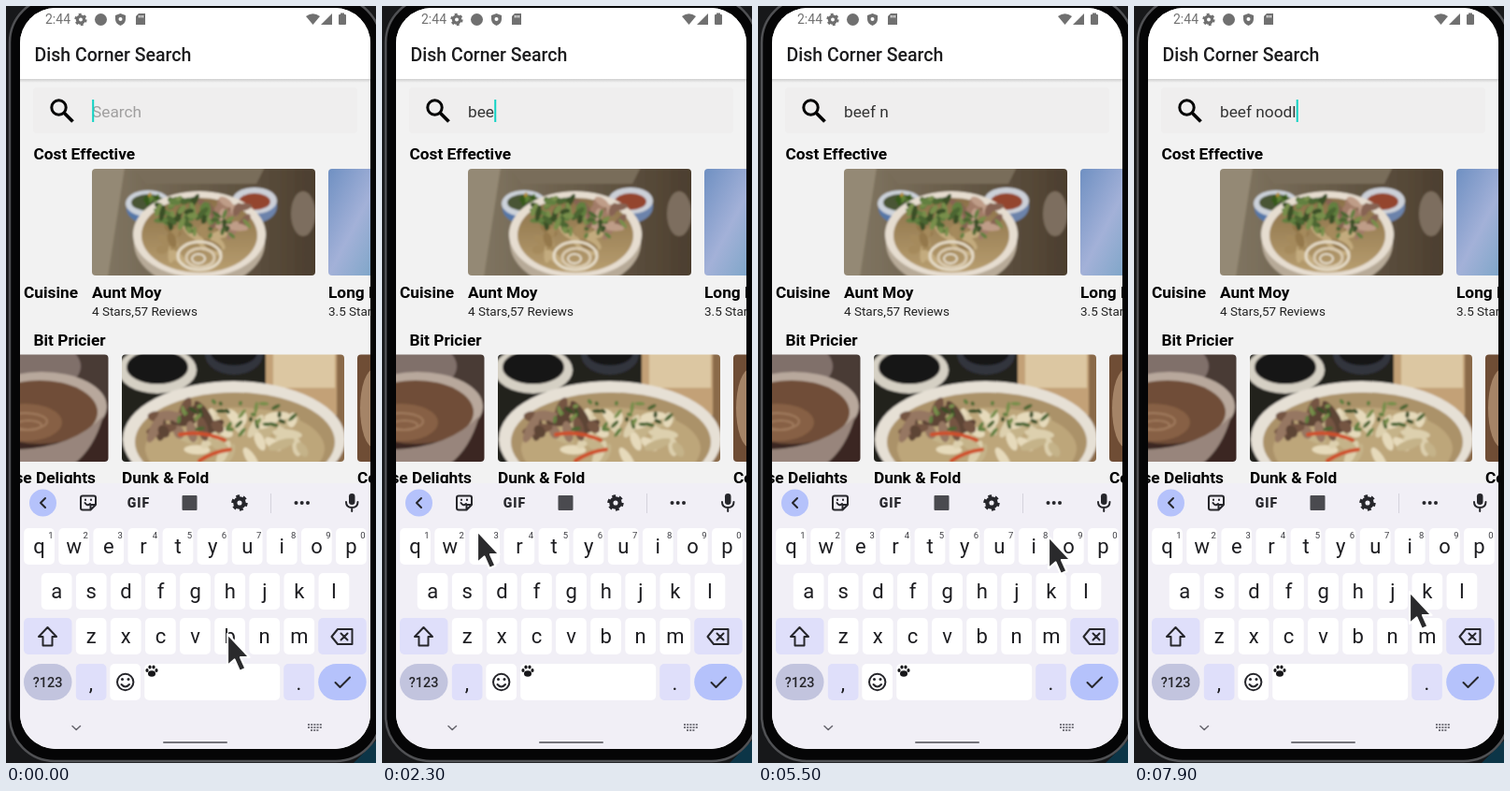
An HTML page for the animation above (8 s loop, 396 by 809 pixels).

```html
<!DOCTYPE html>
<html lang="en">
<head>
<meta charset="utf-8">
<title>Noodle search on a phone</title>
<style>
html, body { margin: 0; width: 100%; height: 100%; overflow: hidden; background: #111; }
svg { display: block; width: 396px; height: 809px; font-family: Roboto, sans-serif; }
.bold { font-weight: 700; font-size: 17.3px; }
.small { font-size: 13.5px; fill: #222; }
.field { font-size: 17.3px; white-space: pre; }
.key { font-size: 22px; text-anchor: middle; fill: #1d1d21; }
.hint { font-size: 9.5px; text-anchor: end; fill: #3c3c42; }
.line { fill: none; stroke: #26262b; stroke-width: 2; stroke-linejoin: round; stroke-linecap: round; }
</style>
</head>
<body>
<svg viewBox="0 0 396 809">
  <defs>
    <clipPath id="screen"><rect x="15" y="2" width="375" height="792" rx="38"/></clipPath>
    <clipPath id="content"><rect x="15" y="78" width="375" height="432"/></clipPath>
    <clipPath id="photoA"><rect x="92" y="174" width="239" height="114" rx="4"/></clipPath>
    <clipPath id="photoB"><rect x="5" y="372.500" width="104.500" height="114.500" rx="4"/></clipPath>
    <clipPath id="photoC"><rect x="124" y="372.500" width="238" height="114.500" rx="4"/></clipPath>
    <filter id="soft"><feGaussianBlur stdDeviation=".9"/></filter>
    <linearGradient id="table"><stop stop-color="#857a66"/><stop offset=".5" stop-color="#685c49"/><stop offset="1" stop-color="#4a3c2d"/></linearGradient>
    <linearGradient id="sky" x2="1" y2="1"><stop stop-color="#6f90c2"/><stop offset=".5" stop-color="#a3b1d8"/><stop offset="1" stop-color="#75a3c4"/></linearGradient>
    <linearGradient id="broth" x2="0" y2="1"><stop stop-color="#8a7048"/><stop offset="1" stop-color="#b89e70"/></linearGradient>
    <linearGradient id="fade" x2="0" y2="1"><stop stop-color="#cfcfcf"/><stop offset="1" stop-color="#f2f2f2"/></linearGradient>
  </defs>
  <rect width="396" height="809" fill="#17181a"/>
  <path d="M372 809L396 785V809Z" fill="#0c3547"/>
  <rect x="4" y="-9" width="397" height="816" rx="48" fill="#050506" stroke="#505154" stroke-width="2.500"/>
  <g clip-path="url(#screen)">
    <rect x="15" width="375" height="809" fill="#f2f2f2"/>
    <rect x="15" width="375" height="78" fill="#fff"/>
    <rect x="15" y="78" width="375" height="4" fill="url(#fade)"/>
    <g id="status" fill="#707070"></g>
    <text x="30.500" y="59" font-size="19.500" font-weight="500" fill="#1c1c1e">Dish Corner Search</text>
    <rect x="29" y="87" width="347" height="49" rx="4" fill="#efeeee"/>
    <circle cx="56.500" cy="108.500" r="7.700" fill="none" stroke="#000" stroke-width="3"/>
    <path d="M62 114L71.500 123.500" stroke="#000" stroke-width="3.800"/>
    <g clip-path="url(#content)">
      <g id="photos"></g>
      <g class="bold">
        <text x="29.500" y="164">Cost Effective</text>
        <text x="77" y="312" text-anchor="end">Cuisine</text>
        <text x="92" y="312">Aunt Moy</text>
        <text x="345" y="312">Long Bay</text>
        <text x="29.500" y="363">Bit Pricier</text>
        <text x="96" y="510" text-anchor="end">se Delights</text>
        <text x="124" y="510">Dunk &amp; Fold</text>
        <text x="376" y="510">Corner</text>
      </g>
      <text class="small" x="92" y="331">4 Stars,57 Reviews</text>
      <text class="small" x="345" y="331">3.5 Stars</text>
    </g>
    <text id="query" class="field" x="92" y="119"></text>
    <rect id="caret" y="100" width="2" height="24" fill="#10d3c4"/>
    <g id="keyboard"></g>
  </g>
  <path id="pointer" d="M0 0V34L7.500 27.500L13 40L19.500 37L14 25H23.500Z" fill="#2a2a2c" stroke="#fff" stroke-width="2.200" stroke-linejoin="round"/>
</svg>
<script>
const $ = id => document.getElementById(id);
const rect = (x, y, w, h, fill, r = 0) =>
  `<rect x="${x}" y="${y}" width="${w}" height="${h}" rx="${r}" fill="${fill}"/>`;
const oval = (x, y, rx, ry, fill, extra = '') =>
  `<ellipse cx="${x}" cy="${y}" rx="${rx}" ry="${ry}" fill="${fill}" ${extra}/>`;
const ring = (x, y, rx, ry, color, w) =>
  oval(x, y, rx, ry, 'none', `stroke="${color}" stroke-width="${w}"`);
const line = (d, extra = '') => `<path class="line" d="${d}" ${extra}/>`;
const shape = (d, fill) => `<path d="${d}" fill="${fill}"/>`;
const text = (cls, x, y, s) => `<text class="${cls}" x="${x}" y="${y}">${s}</text>`;
const photo = (id, body) => `<g clip-path="url(#${id})"><g filter="url(#soft)">${body}</g></g>`;

function gear(x, y, r, color) {
  const tooth = Math.PI * r / 8;
  return ring(x, y, r * .55, r * .55, color, r * .5) +
    oval(x, y, r * .85, r * .85, 'none',
      `stroke="${color}" stroke-width="${r * .35}" stroke-dasharray="${tooth * 1.13}"`);
}

let seed = 7;
const random = () => (seed = seed * 16807 % 2147483647) / 2147483647;

// Scatters small leaves or slices inside an ellipse.
function scatter(n, x, y, rx, ry, size, colors) {
  let out = '';
  for (let i = 0; i < n; i++) {
    const a = random() * 6.28, d = Math.sqrt(random());
    const px = x + Math.cos(a) * d * rx, py = y + Math.sin(a) * d * ry;
    out += oval(px, py, size * (.6 + random()), size * .5, colors[i % colors.length],
      `transform="rotate(${random() * 180} ${px} ${py})"`);
  }
  return out;
}

const greens = ['#4c6631', '#62803f', '#3a4f28', '#788f4c'];
const meats = ['#a27c68', '#bf9d88', '#876452'];
const noodles = ['#ddd0ae', '#c5b389', '#e6dabb'];

$('photos').innerHTML =
  photo('photoA',
    rect(84, 166, 255, 130, 'url(#table)') +
    shape('M84 166H128L108 296H84Z', '#948974') +
    shape('M130 166H280L268 190H150Z', '#796d5a') +
    oval(318, 222, 13, 24, '#7d6e5e') +
    oval(152, 216, 23, 17, '#5577a9') + oval(152, 211, 24, 14, '#ccd2da') + oval(152, 210, 18, 9, '#4a5436') +
    scatter(8, 152, 209, 13, 5, 5, ['#5e8434', '#36591f', '#b08a34']) +
    oval(266, 214, 24, 18, '#6c83ab') + oval(266, 208, 24, 14, '#ccd0d8') + oval(266, 209, 17, 9, '#94452d') +
    oval(207, 253, 70, 48, '#b7aa98') +
    oval(207, 244, 71, 46, '#e6ddd0') + oval(207, 245, 62, 40, 'url(#broth)') +
    scatter(20, 200, 256, 44, 20, 9, ['#a58a5c', '#c3ab7e', '#94784c']) +
    scatter(20, 232, 226, 27, 17, 8, meats) +
    scatter(40, 188, 224, 32, 18, 6, greens) +
    scatter(18, 230, 238, 32, 16, 4, greens) +
    ring(207, 267, 23, 15, '#e6dcc8', 3) + ring(208, 269, 15, 10, '#dacbb0', 3) + ring(206, 270, 7, 5, '#e8e0d0', 2)) +
  rect(345, 174, 60, 114, 'url(#sky)', 4) +
  photo('photoB',
    rect(-5, 364, 125, 134, '#493b35') +
    oval(25, 385, 55, 30, '#80706a') +
    shape('M-5 430Q60 395 119 425V497H-5Z', '#3b2823') +
    oval(38, 428, 70, 37, '#b8a89c') + oval(36, 434, 62, 34, '#704d37') +
    oval(20, 445, 40, 20, '#876045') +
    ring(20, 444, 24, 9, '#a17b5e', 2) + ring(24, 448, 14, 5, '#a17b5e', 2) +
    shape('M5 474Q70 474 104 438Q92 482 60 497H5Z', '#98857b')) +
  photo('photoC',
    rect(116, 364, 254, 132, '#24211f') +
    oval(244, 372, 31, 22, '#33353d') + oval(244, 370, 25, 14, '#171513') +
    rect(278, 364, 92, 74, '#c3a177') + rect(286, 364, 66, 44, '#dcc7a2') +
    rect(354, 364, 16, 132, '#8a6b4a') +
    oval(162, 389, 42, 25, '#d5d0c4') + oval(162, 386, 33, 18, '#191513') +
    oval(244, 463, 119, 62, '#e6e0d5') + oval(245, 466, 107, 53, '#ab9269') +
    oval(245, 473, 96, 44, '#bda67a') +
    scatter(34, 262, 460, 74, 26, 10, noodles) +
    scatter(18, 193, 447, 37, 17, 11, ['#745443', '#967762', '#5d4435']) +
    scatter(30, 248, 438, 65, 18, 4, greens) +
    '<path d="M186 458Q209 453 234 464M207 486Q222 476 240 474" fill="none" stroke="#cf4f2a" stroke-width="4" stroke-linecap="round"/>') +
  rect(376, 372.5, 30, 114.5, '#6f4d35', 4) + oval(394, 430, 15, 42, '#a58467');

$('status').innerHTML =
  '<text x="42" y="19" font-size="14">2:44</text>' +
  gear(80, 14.5, 6.5, '#707070') + oval(101.500, 14.5, 6.5, 6.5, '#707070') +
  shape('M122.500 8L128 10V14Q128 19 122.500 21Q117 19 117 14V10Z', '#707070') +
  oval(122.500, 14, 2, 2, '#fff') +
  shape('M142 8H149V20H139V11Z', '#707070') +
  '<path d="M142.500 10V12.500M144.500 10V12.500M146.500 10V12.500" stroke="#fff"/>' +
  shape('M321 11Q328.500 5.500 336 11L328.500 20Z', '#707070') +
  shape('M337 20L349 8V20Z', '#707070') +
  rect(356, 9, 8, 11, '#707070', 1) + rect(358, 7.500, 4, 2, '#707070');

const PITCH = 37.1, WHITE = '#fff', LILAC = '#dfdffa', BLUE = '#b5c2fb', INK = '#26262b';
const keyRow = (letters, x, y, hints) => [...letters].map((c, i) => {
  const left = x + i * PITCH;
  return rect(left, y, 32.7, 39, WHITE, 5) + text('key', left + 16.4, y + 26.5, c) +
    (hints ? text('hint', left + 31.5, y + 11, (i + 1) % 10) : '');
}).join('');

$('keyboard').innerHTML =
  rect(15, 510, 375, 290, '#f1eff6') +
  oval(39.5, 531, 14.5, 14.5, BLUE) + line('M42 526L37 531L42 536') +
  line('M82 523.5H94Q96 523.5 96 525.5V533L90.5 538.5H82Q80 538.5 80 536.5V525.5Q80 523.5 82 523.5ZM90.5 538V533H96', 'stroke-width="1.8"') +
  line('M84.5 531Q87 535 90 532M85 527.5V528M91 527.5V528') +
  `<text x="142" y="536" font-size="14" font-weight="900" text-anchor="middle" letter-spacing="1" fill="${INK}">GIF</text>` +
  rect(188.500, 523, 16, 16, '#4a4a4f', 1) +
  gear(250, 531, 8.5, INK) + rect(283, 521, 1, 21, '#d5d3dc') +
  [310.500, 316.700, 323].map(x => oval(x, 531, 2, 2, INK)).join('') +
  rect(367, 521, 6.500, 12, INK, 3.2) + line('M364 530Q364 536 370.200 536Q376.500 536 376.500 530M370.200 536V540') +
  keyRow('qwertyuiop', 19.2, 558, true) +
  keyRow('asdfghjkl', 37.8, 606) +
  rect(19, 654, 51.500, 39, LILAC, 5) + line('M44.500 664L54 674H49.500V683.5H39.500V674H35Z') +
  keyRow('zxcvbnm', 74.8, 654) +
  rect(334.200, 654, 51.500, 39, LILAC, 5) +
  line('M355 666H370.500V682H355L348.500 674ZM358.500 670.5L365.500 677.5M365.500 670.5L358.500 677.5') +
  rect(19, 703, 51.500, 39, '#c2c4de', 19.5) +
  `<text x="44.700" y="727.500" font-size="14.500" text-anchor="middle" font-weight="500" fill="${INK}">?123</text>` +
  rect(74.800, 703, 32.700, 39, LILAC, 5) + text('key', 91, 731, ',') +
  rect(111.300, 703, 32.700, 39, WHITE, 5) + ring(127.700, 722.500, 8.7, 8.7, INK, 2) +
  line('M123.500 725Q127.700 730 132 725') + oval(124.500, 719.5, 1.5, 1.5, INK) + oval(131, 719.5, 1.5, 1.5, INK) +
  rect(148.200, 703, 145, 39, WHITE, 5) +
  oval(156, 713.5, 4, 3.3, '#17171a') +
  [[151, 710], [154, 706.500], [158, 706.500], [161, 710]].map(([x, y]) => oval(x, y, 1.6, 2.1, '#17171a')).join('') +
  rect(297.200, 703, 32.700, 39, LILAC, 5) + text('key', 313.500, 731, '.') +
  rect(334.200, 703, 51.500, 39, BLUE, 19.5) + line('M352.500 723L357.500 728L368 717.5') +
  line('M71 769.5L75.200 773.5L79.500 769.5', 'style="stroke:#66656d;stroke-width:1.5"') +
  '<path d="M323 768H338M323 771H338M326 774H335" stroke="#77767e" stroke-width="2" stroke-dasharray="2 1.2"/>' +
  rect(168, 786, 69, 2, '#737279', 1);

// [time, typed text, caret visible]
const typing = [
  [0, '', 1], [300, '', 0], [800, '', 1], [900, 'b', 1], [1100, 'b', 0], [1600, 'b', 1],
  [2000, 'be', 1], [2300, 'bee', 1], [3100, 'bee', 0], [3400, 'beef', 1],
  [4000, 'beef ', 1], [4300, 'beef ', 0], [4600, 'beef ', 1], [4900, 'beef n', 1], [5400, 'beef n', 0],
  [5700, 'beef no', 1], [6000, 'beef noo', 1], [6500, 'beef noo', 0],
  [7000, 'beef nood', 1], [7500, 'beef noodl', 1]
];
// [time, x, y] of the pointer tip
const route = [
  [0, 237, 671], [200, 237, 671], [300, 237, 672], [1000, 237, 672], [1600, 99, 575], [1700, 98, 574],
  [2000, 114, 563], [2100, 82, 560], [2300, 102, 561], [3000, 102, 561], [3100, 170, 616], [3200, 170, 616],
  [3600, 205, 687], [3800, 213, 708], [4100, 212, 708], [4600, 275, 678], [4700, 275, 678],
  [5200, 345, 570], [5300, 345, 570], [5500, 311, 567], [5800, 338, 570], [5900, 338, 570],
  [6400, 179, 621], [6800, 125, 619], [6900, 125, 619], [7100, 102, 636], [7500, 345, 632],
  [7600, 347, 644], [7800, 356, 563], [7900, 295, 626], [8000, 295, 626]
];

function draw(t) {
  const [, typed, visible] = typing.findLast(s => s[0] <= t);
  const query = $('query');
  query.textContent = typed || 'Search';
  query.setAttribute('fill', typed ? '#353535' : '#a09f9f');
  $('caret').setAttribute('x', 92.2 + (typed ? query.getComputedTextLength() : 0));
  $('caret').setAttribute('opacity', visible);

  const i = route.findLastIndex(p => p[0] <= t);
  const [t0, x0, y0] = route[i], [t1, x1, y1] = route[i + 1];
  const k = (t - t0) / (t1 - t0);
  $('pointer').setAttribute('transform', `translate(${x0 + (x1 - x0) * k} ${y0 + (y1 - y0) * k})`);
}

const start = performance.now();
function frame() {
  draw(Math.floor((performance.now() - start) % 8000 / 100) * 100);
  requestAnimationFrame(frame);
}
frame();
</script>
</body>
</html>
```
